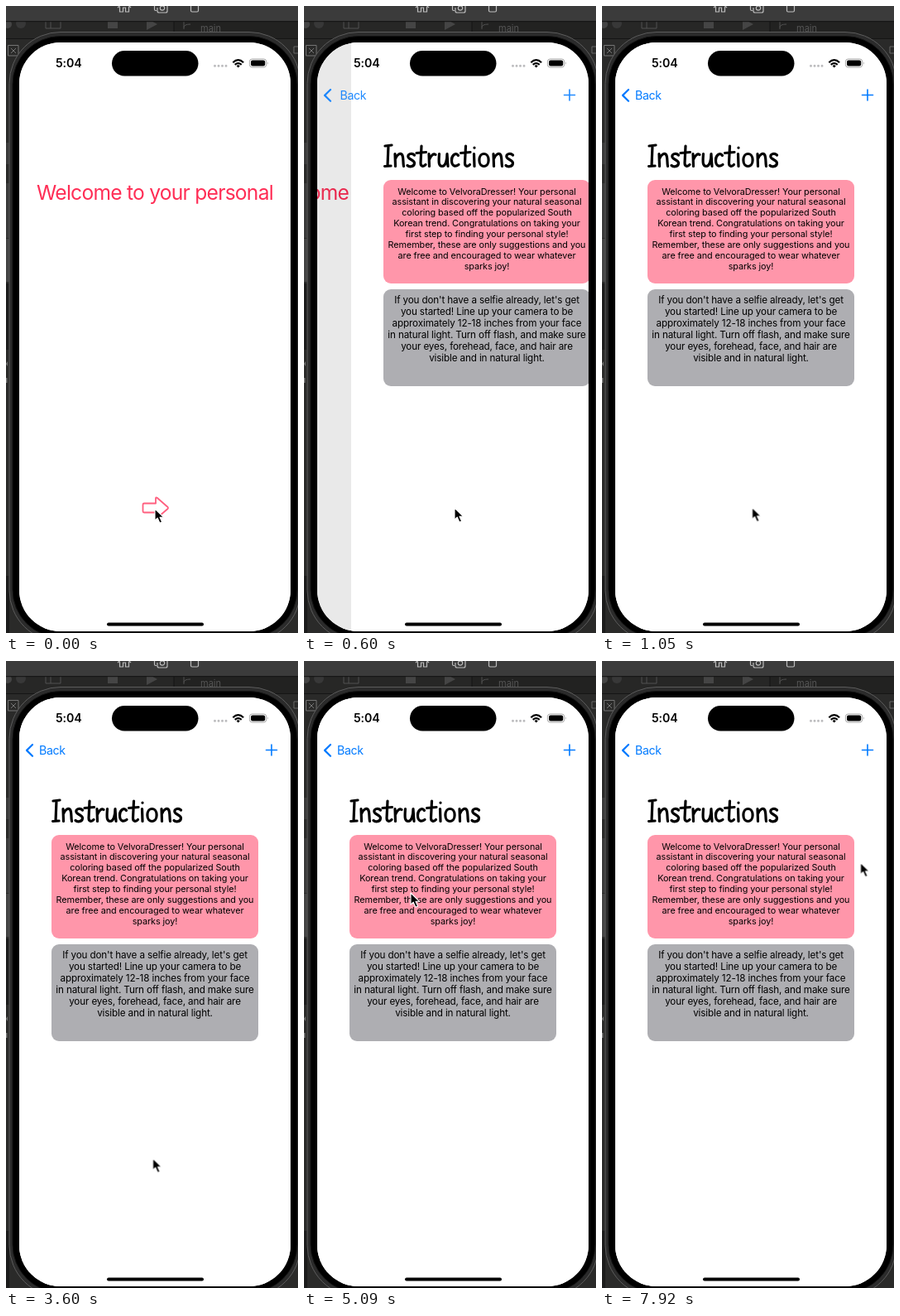
Write an HTML page that moves like this. It is 353 px wide and 757 px high and loops after 8000 ms.

```html
<!DOCTYPE html>
<html lang="en">
<head>
<meta charset="utf-8">
<title>Instructions</title>
<style>
@property --p { syntax: "<number>"; inherits: true; initial-value: 0; }
html, body { margin: 0; width: 100%; height: 100%; overflow: hidden; background: #282828; }
body { position: relative; font-family: Inter, "Liberation Sans", sans-serif; font-optical-sizing: none; color: #000; }
svg { position: absolute; left: 0; top: 0; overflow: hidden; }
.stage, .screen, .page { position: absolute; }
.stage { left: 0; top: 0; width: 353px; height: 757px; overflow: hidden; }
.screen { left: 16px; top: 44px; width: 328px; height: 711px; border-radius: 50px; overflow: hidden; background: #fff; animation: push 8s step-end infinite; }
.page { inset: 0; background: #fff; }

/* --p is the progress of the page push */
.home { transform: translateX(calc(var(--p) * -98px)); }
.dim { position: absolute; inset: 0; background: #000; opacity: calc(var(--p) * .1); }
.guide { transform: translateX(calc((1 - var(--p)) * 328px)); }
.nav { opacity: var(--p); }
.label { transform: translateX(calc((1 - var(--p)) * 28px)); }

.welcome { position: absolute; left: 0; width: 328px; top: 165px; margin: 0; line-height: 32px; font-size: 24.6px; letter-spacing: -.75px; text-align: center; white-space: nowrap; color: #ff2d55; }
.card { position: absolute; left: 39px; width: 250px; margin: 0; border-radius: 9px; box-sizing: border-box; text-align: center; white-space: nowrap; }
.pink { top: 166px; height: 125px; padding-top: 7.5px; background: #ff96aa; font-size: 10.85px; line-height: 12.93px; letter-spacing: -.09px; }
.gray { top: 298px; height: 117px; padding-top: 7px; background: #aeaeb2; font-size: 11.68px; line-height: 13.94px; letter-spacing: -.13px; }
.cursor { animation: move 8s step-end infinite; }

@keyframes push {
  0% { --p: 0; }
  5.625% { --p: .25; }
  7.5% { --p: .875; }
  9.375% { --p: .988; }
  11.25%, 100% { --p: 1; }
}
@keyframes move {
  0% { transform: translate(180px, 607px); }
  7.5% { transform: translate(182px, 606px); }
  13.125% { transform: translate(181.5px, 605.5px); }
  45% { transform: translate(177.5px, 600.5px); }
  46.875% { transform: translate(107px, 468px); }
  48.75% { transform: translate(106.5px, 467.5px); }
  50.625% { transform: translate(110.5px, 335px); }
  52.5% { transform: translate(118px, 318px); }
  54.375% { transform: translate(121.5px, 279px); }
  56.25% { transform: translate(145px, 210px); }
  58.125% { transform: translate(155px, 210.5px); }
  60% { transform: translate(122px, 272px); }
  61.75% { transform: translate(166px, 220px); }
  63.625% { transform: translate(129px, 280px); }
  65.375% { transform: translate(192.5px, 244px); }
  67.25% { transform: translate(212px, 244px); }
  69.125% { transform: translate(278px, 242px); }
  71% { transform: translate(278.5px, 241px); }
  72.875% { transform: translate(297px, 241px); }
  74.625% { transform: translate(309px, 242.5px); }
  76.5% { transform: translate(311.5px, 243px); }
  99%, 100% { transform: translate(312.5px, 243.5px); }
}
</style>
</head>
<body>
<div class="stage">
  <!-- desktop and device body -->
  <svg width="353" height="757">
    <rect width="353" height="757" fill="#2a2a29"/>
    <rect y="19" width="353" height="21" fill="#272726"/>
    <rect x="203" y="19" width="150" height="21" fill="#222221"/>
    <path d="M203 19V40M0 39.5H353" stroke="#151515"/>
    <g fill="#454545">
      <circle cx="2" cy="22" r="5"/><circle cx="18" cy="21" r="6" fill="#383838"/>
      <path d="M123 17h12v10h-12zM170 15l13 7-13 7z"/>
    </g>
    <g fill="none" stroke="#505050">
      <path d="M48 16h18v11H48zM54 16v11M215 19v9M215 26q0-4 8-4"/>
      <path stroke="#747474" d="M2.500 47.500h12.500v12.500H2.500zM6 51l6 6M12 51l-6 6"/>
      <path stroke="#666" d="M353 49h-5v8h5"/>
    </g>
    <text x="235" y="31" font-size="11" fill="#555">main</text>
    <g fill="#3b3b3b">
      <path d="M0 165h4v26H0zM0 214h4v66H0z"/>
      <path fill="#444" d="M0 281h4v52H0z"/>
      <path fill="#1c1c1c" d="M0 335h4v80H0zM0 688h4v69H0z"/>
      <path fill="#777" d="M2 429l-2 3 2 3zM0 449h1.500v6H0z"/>
    </g>
    <rect width="353" height="18.500" fill="#3b3b3b"/>
    <path d="M0 18.700H353" stroke="#111" stroke-width="1"/>
    <g fill="none" stroke="#bdbdbd" stroke-width="1.200">
      <path d="M135 2l8-7 8 7M137.500 1v6h4V2h3v5h4V1"/>
      <path d="M179.500 0v4q0 1.500 1.500 1.500h1M183 2v4q0 2 2 2h8q2 0 2-2V-1"/>
      <circle cx="189" cy="2.500" r="2.700"/>
      <path d="M223.500 0v5.500q0 1.500 1.500 1.500h6q1.500 0 1.500-1.500V0"/>
    </g>
    <rect x="4" y="31.500" width="352" height="736" rx="62" fill="#2b2b2b" stroke="#5c5c5c"/>
    <rect x="8" y="36.500" width="344" height="726" rx="58" fill="#000" stroke="#111"/>
  </svg>

  <div class="screen">
    <div class="page home">
      <p class="welcome">Welcome to your personal</p>
      <svg width="328" height="711">
        <path transform="translate(-16 -44)" d="M167 600.500H181V594.500Q181 592.500 182.700 593.800L195.300 604.700Q196.600 606 195.300 607.300L182.700 618Q181 619.300 181 617.500V611.500H167Q165.500 611.500 165.500 610V602Q165.500 600.500 167 600.500Z" fill="none" stroke="#ff5f7f" stroke-width="1.800" stroke-linejoin="round"/>
      </svg>
      <div class="dim"></div>
    </div>
    <div class="page guide">
      <svg width="328" height="160" role="img" aria-label="Instructions">
        <title>Instructions</title>
        <defs>
          <path id="n" d="M1.500-16L2-1M2-10C4-15 8-18 10-15C12-12 11-6 12-1"/>
          <path id="s" d="M9.500-14.500C6-18 1-15.500 2-12C3-9 10-8.500 9.500-4.500C9 0 3 0 1-2"/>
          <path id="t" d="M6-25.500L5-5C5 0 9-.5 11-3M0-17L11.500-18"/>
        </defs>
        <g transform="translate(39 150.500)" fill="none" stroke="#000" stroke-width="3.200" stroke-linecap="round" stroke-linejoin="round">
          <path d="M2-25.500L10-26.500M6-26L5-1.500M1.500-1L9-1.500"/>
          <use href="#n" x="12.500"/>
          <use href="#s" x="28"/>
          <use href="#t" x="40"/>
          <path transform="translate(53.500)" d="M1.500-16L2-1M2-9C4-14 7-17 9.500-15"/>
          <path transform="translate(66)" d="M1.500-16C1-8 0-1 5-1C9-1 11-8 11-16L12-1"/>
          <path transform="translate(81)" d="M9.500-14C6-19 1-13 1.500-8C1.500-1 6 0 10-3"/>
          <use href="#t" x="93.500"/>
          <path transform="translate(108)" d="M1.500-16L2-1M2-23.500v.2"/>
          <path transform="translate(114.500)" d="M7-16C-.5-16-.5-1 7-1S14.500-16 7-16"/>
          <use href="#n" x="131.500"/>
          <use href="#s" x="147"/>
        </g>
      </svg>
      <p class="card pink">Welcome to VelvoraDresser! Your personal<br>assistant in discovering your natural seasonal<br>coloring based off the popularized South<br>Korean trend. Congratulations on taking your<br>first step to finding your personal style!<br>Remember, these are only suggestions and you<br>are free and encouraged to wear whatever<br>sparks joy!</p>
      <p class="card gray">If you don't have a selfie already, let's get<br>you started! Line up your camera to be<br>approximately 12-18 inches from your face<br>in natural light. Turn off flash, and make sure<br>your eyes, forehead, face, and hair are<br>visible and in natural light.</p>
    </div>
    <svg class="nav" width="328" height="711">
      <g transform="translate(-16 -44)" fill="none" stroke="#007aff" stroke-linecap="round" stroke-linejoin="round">
        <path d="M32 101L25 107.900L32 114.800" stroke-width="2.200"/>
        <path d="M314.500 107.500H327.500M321 101V114" stroke-width="1.600"/>
        <text class="label" x="40" y="112.700" font-size="14.200" letter-spacing="-.35" fill="#007aff" stroke="none">Back</text>
      </g>
    </svg>
  </div>

  <!-- status bar, home bar and pointer -->
  <svg width="353" height="757">
    <text x="60" y="74" font-size="14.200" font-weight="600" letter-spacing="-.1">5:04</text>
    <rect x="128" y="54" width="104.500" height="30.500" rx="15.250"/>
    <path d="M252.500 72.300h15" stroke="#bcbcbe" stroke-width="3" stroke-linecap="round" stroke-dasharray="0 4.500"/>
    <g fill="none" stroke="#000" stroke-width="2.100">
      <path d="M274.300 68.200Q280.700 62.200 287.100 68.200M276.700 70.900Q280.700 67.300 284.700 70.900"/>
      <path d="M278.600 72.200Q280.700 70.500 282.800 72.200L280.700 74.500Z" fill="#000" stroke="none"/>
    </g>
    <rect x="294.400" y="64" width="20.300" height="10" rx="3.200" fill="none" stroke="#9b9b9b" stroke-width=".9"/>
    <rect x="296" y="65.500" width="17.200" height="7" rx="2"/>
    <path d="M316 67.300q1.500 1.700 0 3.400z" fill="#9b9b9b"/>
    <rect x="122" y="744.500" width="117" height="4" rx="2"/>
    <path class="cursor" d="M0 0V14.200L3.200 11.200L5.900 17.200L8.600 16L6 10.200H10.400Z" stroke="#fff" stroke-width="1.100" stroke-linejoin="round"/>
  </svg>
</div>
</body>
</html>
```
